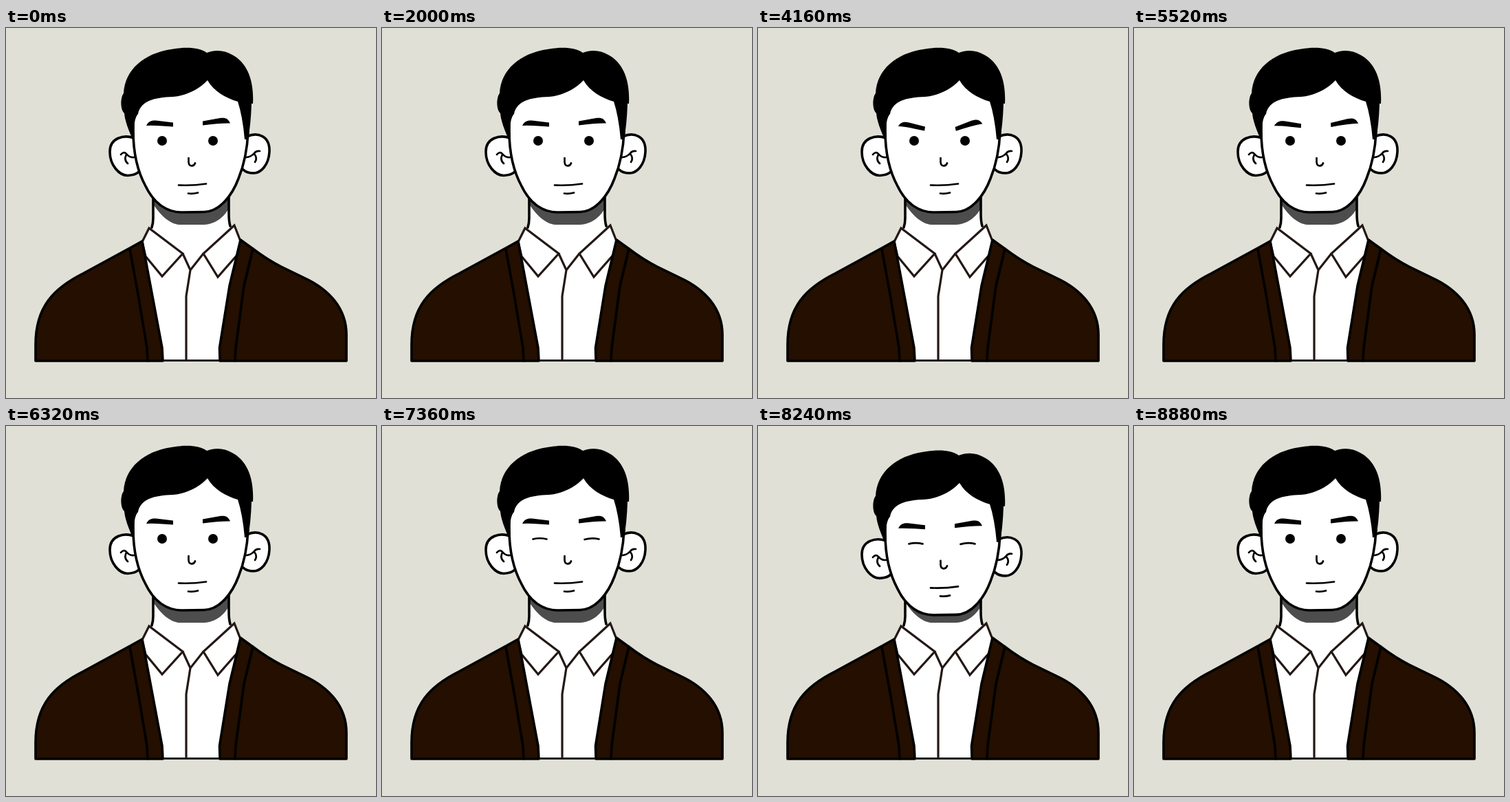
Animation of 538 by 538 pixels, one loop 10000 ms. Source, as an HTML page:

```html
<!DOCTYPE html>
<html lang="en">
<head>
<meta charset="utf-8">
<title>Portrait</title>
<style>
  html, body { margin: 0; width: 100%; height: 100%; overflow: hidden; background: #e0e0d6; }
  svg { display: block; width: 100%; height: 100%; }
  .ink { stroke: #000; stroke-width: 3.6; stroke-linecap: round; stroke-linejoin: round; }
  .thin { stroke-width: 2.7; }
  .seam { stroke: #231815; stroke-width: 3.2; stroke-linejoin: miter; }
</style>
</head>
<body>
<svg viewBox="0 0 538 538" fill="none">
  <!-- neck and shirt -->
  <path fill="#fff" d="M214 235H324V288L341 310L311 484H228L198 310L213 290Z"/>
  <path fill="#4d4d4d" d="M214 244V256C224 272 238 285 252 286H288C305 285 318 274 324 262V240Z"/>
  <path class="ink" d="M214 240V276Q214 284 212 290M324 240V270Q324 281 326 288"/>
  <g class="seam" fill="#fff">
    <path d="M208 291L198 311L203 332L227 361L257 328Z"/>
    <path d="M332 287L287 328L308 362L337 329L341 310Z"/>
    <path fill="none" d="M257 328L268 352L287 328M268 352L262 390V484M228 483.5H311"/>
  </g>
  <!-- cardigan -->
  <g class="ink" fill="#240f00">
    <path d="M198 310L180 320L112 357C70 378 43 405 43 460V484H228L227 465L212 385Z"/>
    <path d="M341 308L359 321Q380 337 400 347L433 363C470 380 495 408 495 446V484H311L310.5 465L325 375Z"/>
    <path fill="none" d="M180 321L193 393L205 465L206 484M359 321L346 375L334 465L333 484"/>
  </g>
  <g id="head">
    <g class="ink" fill="#fff">
      <path d="M186 160C172 155 151 159 151 180C151 200 165 214.500 177 214.500C185 214 190 212 193 209"/>
      <path d="M350 158C365 151 384 156 383 180C382 200 370 211 360 211C352 211 347 208 345 206"/>
      <path d="M185 110V150C185 178 190 206 203 230C216 257 236 268 255 268L288 267.500C311 267 329 243 338 219C347 197 351 175 352 150V110L293 65Z"/>
    </g>
    <path class="ink thin" d="M167 184Q171 179 175 183Q180 189 186 188M175 184Q171 192 177 197M350 188Q357 187 361 182Q364 178 369 179M361 183Q366 189 362 195"/>
    <path fill="#000" d="M185 164C178 148 173 135 172 124C166 119 166 101 171 95C173 60 201 37 240 31C262 27 281 28 292 36C304 31 318 32 329 39C350 50 361 75 359 110H357Q356 140 352 162H347Q344 128 337 107C320 102 302 92 293 76C280 90 262 98 243 100C215 101 196 106 192 125C185 133 186 150 187 164Z"/>
    <path class="ink thin" d="M265.500 189V195C266 202 273 202 275 196.500M251 228.500Q271 229.500 291 226.500M265 240.500Q272 241.500 279 239.500"/>
    <g id="eyesOpen" fill="#000"><circle cx="227" cy="164" r="7"/><circle cx="301" cy="164" r="7"/></g>
    <path id="eyesShut" class="ink thin" d="M219.500 164.500Q229 162 239.500 164.500M294.500 165Q305 162 315.500 164.500"/>
    <path id="browLeft" fill="#000" d="M204 142C207 136 211 134 218 134.500L243 137.500V143.500L228 142.500Q214 141.500 204 142Z"/>
    <path id="browRight" fill="#000" d="M286 135.500L311 131C320 130 323 132 326 138.500Q312 138 286 141.500Z"/>
  </g>
</svg>
<script>
  const LOOP = 10000, STEP = 80;
  const part = id => document.getElementById(id);
  const [head, eyesOpen, eyesShut, browLeft, browRight] =
    ['head', 'eyesOpen', 'eyesShut', 'browLeft', 'browRight'].map(part);

  const smooth = k => k * k * (3 - 2 * k);
  const out = k => 1 - (1 - k) ** 3;
  const outSoft = k => 1 - (1 - k) ** 2;

  // Keys are [time, value, easing into this key].
  function track(keys, t) {
    const next = keys.findIndex(key => key[0] > t);
    if (next === 0) return keys[0][1];
    if (next < 0) return keys[keys.length - 1][1];
    const [t0, v0] = keys[next - 1];
    const [t1, v1, ease = smooth] = keys[next];
    return v0 + (v1 - v0) * ease((t - t0) / (t1 - t0));
  }

  const RAISE = [[640, 0], [1040, -8.5], [1680, -8.5], [2000, 0]];
  const FROWN = [[2800, 0], [3200, 0.97], [3760, 1], [5280, 1], [6000, 0, out]];
  const NOD = [[7360, 0], [7620, -3.8], [8320, 7, outSoft], [8560, 0]];

  function draw(now) {
    const t = Math.floor(now % LOOP / STEP) * STEP;
    const lift = track(RAISE, t), frown = track(FROWN, t);
    const shut = t >= 7360 && t < 8880;
    const drop = lift + frown;
    head.setAttribute('transform', `translate(0 ${track(NOD, t)})`);
    browLeft.setAttribute('transform', `translate(0 ${drop}) rotate(${7.5 * frown} 205 140)`);
    browRight.setAttribute('transform', `translate(0 ${drop}) rotate(${-11 * frown} 325 136)`);
    eyesOpen.style.display = shut ? 'none' : '';
    eyesShut.style.display = shut ? '' : 'none';
  }

  const start = performance.now();
  (function frame() {
    draw(performance.now() - start);
    requestAnimationFrame(frame);
  })();
</script>
</body>
</html>
```
